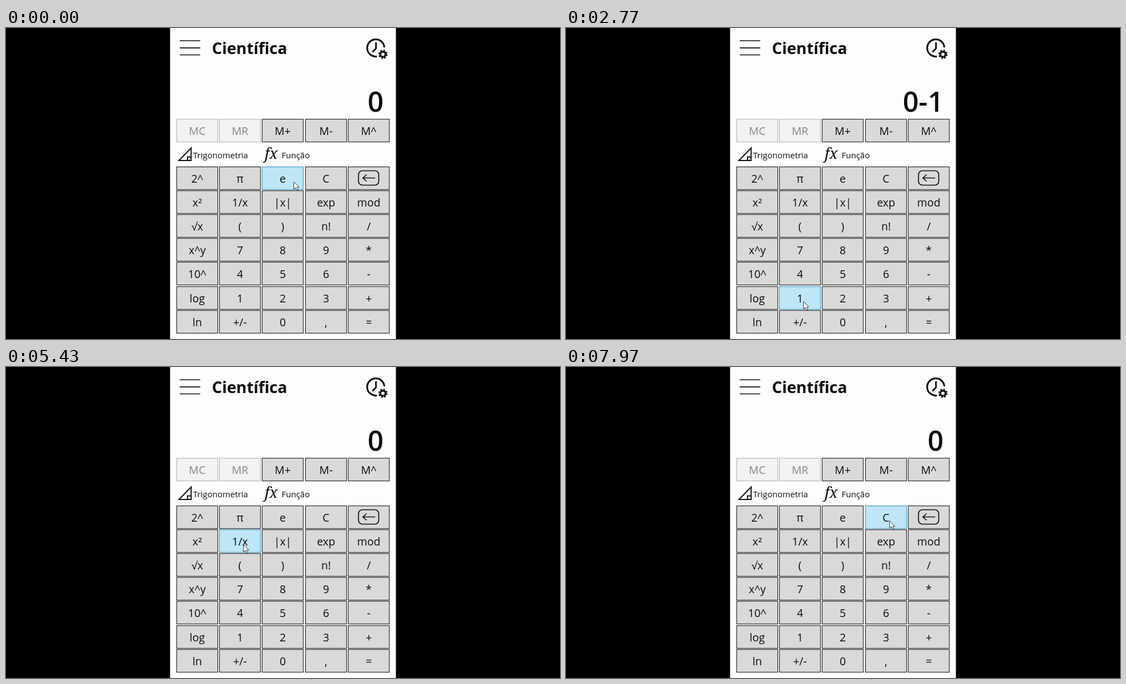
Write an HTML page with a canvas that moves like this. It is 998x561 px and loops after 8.01 s.

```html
<!DOCTYPE html>
<html lang="pt">
<head>
<meta charset="utf-8">
<title>Científica</title>
<style>
html, body { margin: 0; width: 100%; height: 100%; overflow: hidden; background: #000; }
canvas { display: block; }
</style>
</head>
<body>
<canvas id="stage" width="998" height="561"></canvas>
<script>
const ctx = document.getElementById('stage').getContext('2d');
const LOOP = 8010;
const SANS = '"Open Sans", "Noto Sans", sans-serif';
const INK = '#0c0c0c';
const W = 74, H = 41;

// Keys, row by row; the first row is the memory row
const KEYS = [
  'MC MR M+ M- M^', '2^ π e C ←', 'x² 1/x |x| exp mod', '√x ( ) n! /',
  'x^y 7 8 9 *', '10^ 4 5 6 -', 'log 1 2 3 +', 'ln +/- 0 , ='
].flatMap((row, r) => row.split(' ').map((label, c) => ({
  label,
  x: Math.round(307 + c * 77.2) + 0.5,
  y: (r ? Math.round(250 + (r - 1) * 43.1) : 164) + 0.5
})));

// The pointer waits on a key before and after pressing it
const WAIT = 180, LINGER = 100;

// Each press: time, key and what the display then shows
const PRESSES = [
  { at: -LINGER, show: '0', spot: [518, 277] },
  { at: 400, key: 'log', show: 'O argumento deve ser maior que zero', error: true },
  { at: 1070, key: 'C', show: '0' },
  { at: 1600, key: '-', show: '0-' },
  { at: 2700, key: '1', show: '0-1' },
  { at: 3200, key: '=', show: '-1', history: '0-1' },
  { at: 4140, key: '√x', show: 'O argumento não pode ser negativo', error: true },
  { at: 4760, key: 'C', show: '0' },
  { at: 5510, key: '1/x', show: 'Não é possível dividir por zero', error: true },
  { at: 6020, key: 'C', show: '0' },
  { at: 6440, key: '+', show: '0+' },
  { at: 6850, key: '=', show: 'Expressão inválida', error: true },
  { at: 7850, key: 'C', show: '0' }
];

function spotOf({ key, spot }) {
  if (spot) return spot;
  const { x, y } = KEYS.find(k => k.label === key);
  return [x + W / 2 + 6, y + H / 2 + 6];
}

function pointerAt(t, i) {
  const from = PRESSES[i], to = PRESSES[i + 1] || from;
  const leave = from.at + LINGER, arrive = to.at - WAIT;
  const u = to === from ? 0 : Math.min(1, Math.max(0, (t - leave) / (arrive - leave)));
  const k = u * u * (3 - 2 * u);
  const a = spotOf(from), b = spotOf(to);
  return a.map((v, axis) => v + (b[axis] - v) * k);
}

function text(str, x, y, font, align = 'left', color = INK) {
  ctx.font = font;
  ctx.textAlign = align;
  ctx.fillStyle = color;
  ctx.fillText(str, x, y);
}

function stroke(path, width = 2, color = INK) {
  ctx.lineWidth = width;
  ctx.strokeStyle = color;
  ctx.stroke(new Path2D(path));
}

function ring(x, y, r, width, dash = []) {
  ctx.setLineDash(dash);
  ctx.lineWidth = width;
  ctx.beginPath();
  ctx.arc(x, y, r, 0, 2 * Math.PI);
  ctx.stroke();
  ctx.setLineDash([]);
}

function drawHeader() {
  stroke('M313 23H350M313 35.8H350M313 48.5H350', 1.7);
  text('Científica', 371, 47, `700 28.6px ${SANS}`);
  // Clock with a gear
  stroke('M668 51.4A15.5 15.5 0 1 1 681.6 35', 3.2);
  stroke('M666.5 26V37L660 43.5', 2.8);
  const tooth = 2 * Math.PI * 6.4 / 16;
  ring(679, 47.5, 6.4, 4, [tooth, tooth]);
  ring(679, 47.5, 4.7, 3.4);
}

function drawLabels() {
  stroke('M311.5 239H333.5V216.5ZM327 239V232.5H333', 2);
  text('Trigonometria', 337, 235, `15px ${SANS}`);
  text('fx', 466, 236, 'italic 27px "Noto Serif", serif');
  text('Função', 496.5, 235, `15px ${SANS}`);
}

function drawDisplay({ show, error, history }) {
  const weight = history ? 700 : 600;
  let size = 50;
  if (error) {
    ctx.font = `${weight} ${size}px ${SANS}`;
    size *= Math.min(1, 377 / ctx.measureText(show).width);
  }
  text(show, error ? 305 : 680, 128 + 0.46 * size, `${weight} ${size}px ${SANS}`,
    error ? 'left' : 'right', error ? '#cc0018' : INK);
  if (history) text(history, 673.5, 89, `21px ${SANS}`, 'right');
}

function drawKey({ label, x, y }, error, [px, py]) {
  const off = /^M[CR]$/.test(label) || error && !/^(M.|C|←|=|\d)$/.test(label);
  const hover = !off && px >= x && px <= x + W && py >= y && py <= y + H;
  ctx.fillStyle = off ? '#f1f3f0' : hover ? '#bee6f6' : '#d9d9d8';
  ctx.fillRect(x, y, W, H);
  ctx.lineWidth = 1.2;
  ctx.strokeStyle = off ? '#b4b9c0' : hover ? '#4b94bd' : '#2a2a2a';
  ctx.strokeRect(x, y, W, H);
  if (label === '←') {
    ctx.lineWidth = 1.7;
    ctx.strokeStyle = INK;
    ctx.beginPath();
    ctx.roundRect(635, 257.5, 36.5, 26, 7);
    ctx.stroke();
    stroke('M665 270.5H643M649.5 264.5L643 270.5L649.5 276.5', 1.7);
  } else {
    text(label, x + W / 2, y + 28.5, `19.5px ${SANS}`, 'center', off ? '#868686' : INK);
  }
}

function drawPointer([x, y]) {
  ctx.save();
  ctx.translate(x, y);
  const arrow = 'M.5 .5V14L3.6 11L6 16.3L8.3 15.3L6 10.2H10Z';
  ctx.fillStyle = '#fff';
  ctx.fill(new Path2D(arrow));
  stroke(arrow, 1, '#333');
  ctx.restore();
}

function draw(now) {
  const t = now % LOOP;
  const i = PRESSES.filter(p => p.at <= t).length - 1;
  const state = PRESSES[i], pointer = pointerAt(t, i);
  ctx.fillStyle = '#000';
  ctx.fillRect(0, 0, 998, 561);
  ctx.fillStyle = '#fdfdfc';
  ctx.fillRect(295.6, 0, 406.8, 561);
  drawHeader();
  drawDisplay(state);
  drawLabels();
  KEYS.forEach(key => drawKey(key, state.error, pointer));
  drawPointer(pointer);
}

const start = performance.now();
(function frame() {
  draw(performance.now() - start);
  requestAnimationFrame(frame);
})();
</script>
</body>
</html>
```
